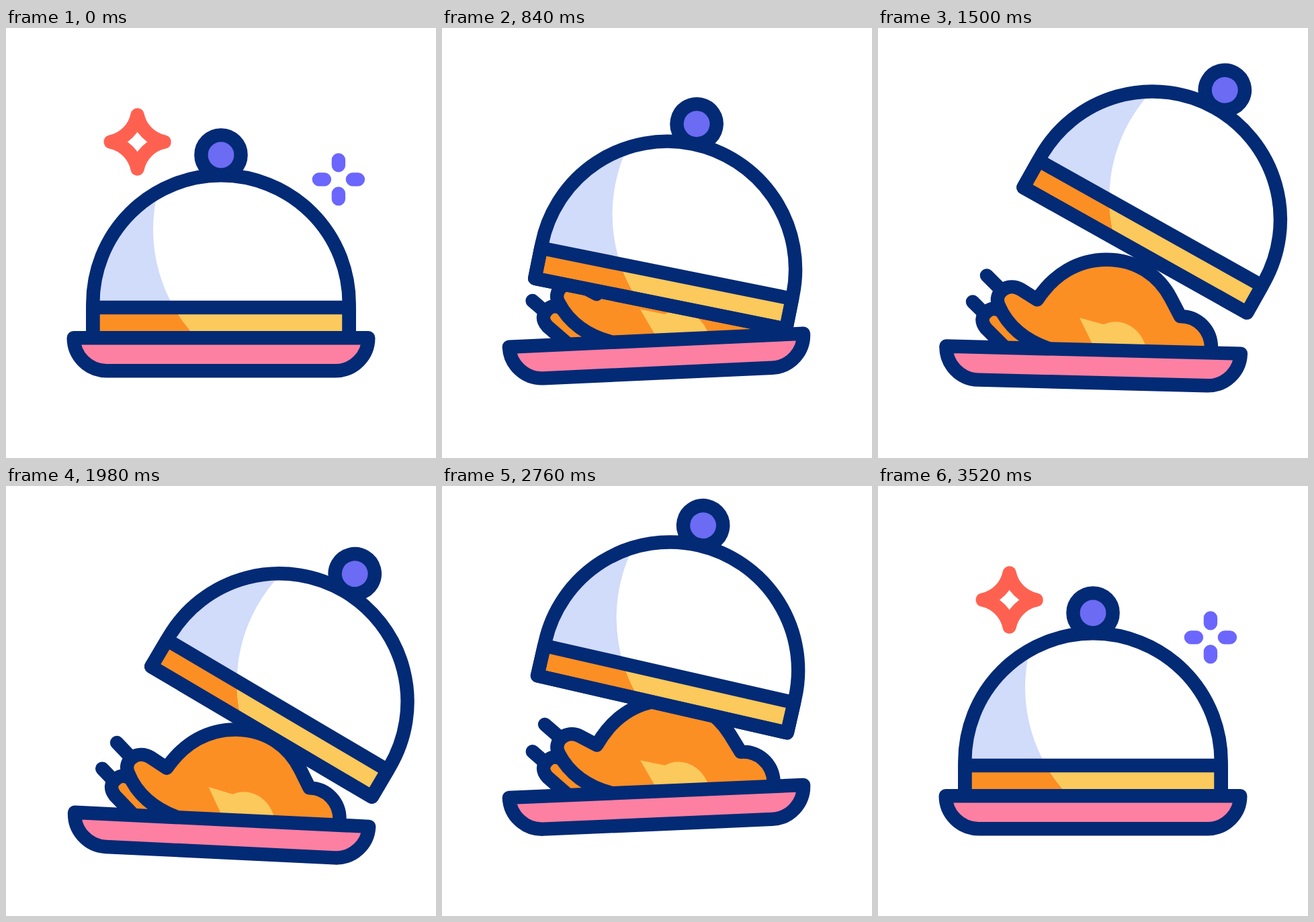
An HTML page that plays this animation: 640 px wide and 640 px high, repeating every 3.6 s.

```html
<!DOCTYPE html>
<html lang="en">
<head>
<meta charset="utf-8">
<title>Serving dish</title>
<style>
  html, body { margin: 0; height: 100%; overflow: hidden; background: #fff; }
  svg { display: block; width: 100vw; height: 100vh; }
  .line { fill: none; stroke: #032a75; }
</style>
</head>
<body>
<svg viewBox="0 0 640 640" stroke-width="20.4" stroke-linecap="round" stroke-linejoin="round">
  <defs>
    <path id="dome" d="M129.3 462V410A190.7 190.7 0 0 1 510.7 410V462Z"/>
    <path id="band" d="M129.3 416H510.7V462H129.3Z"/>
    <clipPath id="lit"><circle cx="451" cy="300" r="232"/></clipPath>
  </defs>

  <g id="roast">
    <g class="line" transform="rotate(-1.5 320 485.5) translate(0 -17.5)">
      <path d="M162 368L185 391M141 407L156 422"/>
      <path fill="#fb8f24" d="M212 498L161 447Q149 432 163 421Q172 414 184 421L270 498Z"/>
      <path fill="#fb8f24" d="M285 495L252 476C220 465 193 444 180 413C171 394 193 377 213 389L237 404C262 366 298 344.5 340 344.5C385 344.5 418 368 436 402L450 429C476 429 496 449 496 476V495Z"/>
      <path fill="#fbc95c" stroke="none" d="M300 431L322 476H399C392 446 362 429 336 441Z"/>
    </g>
  </g>

  <g id="lid">
    <circle class="line" style="fill:#6b6bf3" cx="320" cy="189" r="29.6"/>
    <use href="#dome" fill="#d1dbfa"/>
    <use href="#band" fill="#fb8f24"/>
    <g clip-path="url(#lit)">
      <use href="#dome" fill="#fff"/>
      <use href="#band" fill="#fbc95c"/>
    </g>
    <g class="line"><use href="#dome"/><use href="#band"/></g>
  </g>

  <g id="tray">
    <path stroke="#032a75" fill="#fd80a2" d="M100.7 461.3H539.3A49 49 0 0 1 490.5 510.2H149.5A49 49 0 0 1 100.7 461.3Z"/>
  </g>

  <path id="star" fill="none" stroke="#ff6151" d="M0-40C4-20 20-4 40 0C20 4 4 20 0 40C-4 20-20 4-40 0C-20-4-4-20 0-40Z"/>
  <path id="twinkle" fill="none" stroke="#6b66fd" d="M0-29V-21M0 21V29M-29 0H-21M21 0H29"/>
</svg>
<script>
const LOOP = 3600, STEP = 20;
const part = id => document.getElementById(id);
const clamp = v => Math.min(1, Math.max(0, v));
const progress = (t, from, to) => clamp((t - from) / (to - from));
const smooth = u => u * u * (3 - 2 * u);

// Starts at 0 and eases to each [time, value] in turn
function ease(t, start, ...stops) {
  let from = start, value = 0;
  for (const [to, target] of stops) {
    value += (target - value) * smooth(progress(t, from, to));
    from = to;
  }
  return value;
}

const place = (id, x, y, angle, pivotY) =>
  part(id).setAttribute('transform', `translate(${x} ${y}) rotate(${angle} 320 ${pivotY})`);

function sparkle(id, x, y, amount) {
  const scale = Math.max(0.01, 1 - (1 - amount) ** 2);
  const el = part(id);
  el.setAttribute('transform', `translate(${x} ${y}) scale(${scale})`);
  el.setAttribute('stroke-width', 20.4 / scale);
  el.setAttribute('opacity', amount);
}

function draw(t) {
  const lidX = ease(t, 635, [1400, 87], [1800, 94.6], [2700, 20], [3040, 13.4], [3420, 0]);
  const lidY = ease(t, 610, [1200, -150], [1890, -87.5], [2740, -136.5], [3230, 0]);
  const lidAngle = ease(t, 490, [1300, 28.6], [1900, 31.2], [2180, 28], [3280, 0]);
  place('lid', lidX, lidY, lidAngle, 410);

  const trayY = ease(t, 600, [1300, 12.5], [1940, 35.2], [3000, -13.2], [3400, 0]);
  const trayAngle = ease(t, 440, [1050, -3.6], [1800, 4.2], [2460, -3.7], [3240, 0]);
  place('tray', 0, trayY, trayAngle, 485.5);
  place('roast', 0, trayY, trayAngle, 485.5);

  sparkle('star', 195.6, 169.5, 1 - progress(t, 200, 600) + progress(t, 2920, 3520));
  sparkle('twinkle', 494.9, 225.4, 1 - progress(t, 280, 680) + progress(t, 3060, 3520));
}

const start = performance.now();
function tick() {
  const t = (performance.now() - start) % LOOP;
  draw(Math.floor(t / STEP) * STEP);
  requestAnimationFrame(tick);
}
tick();
</script>
</body>
</html>
```
